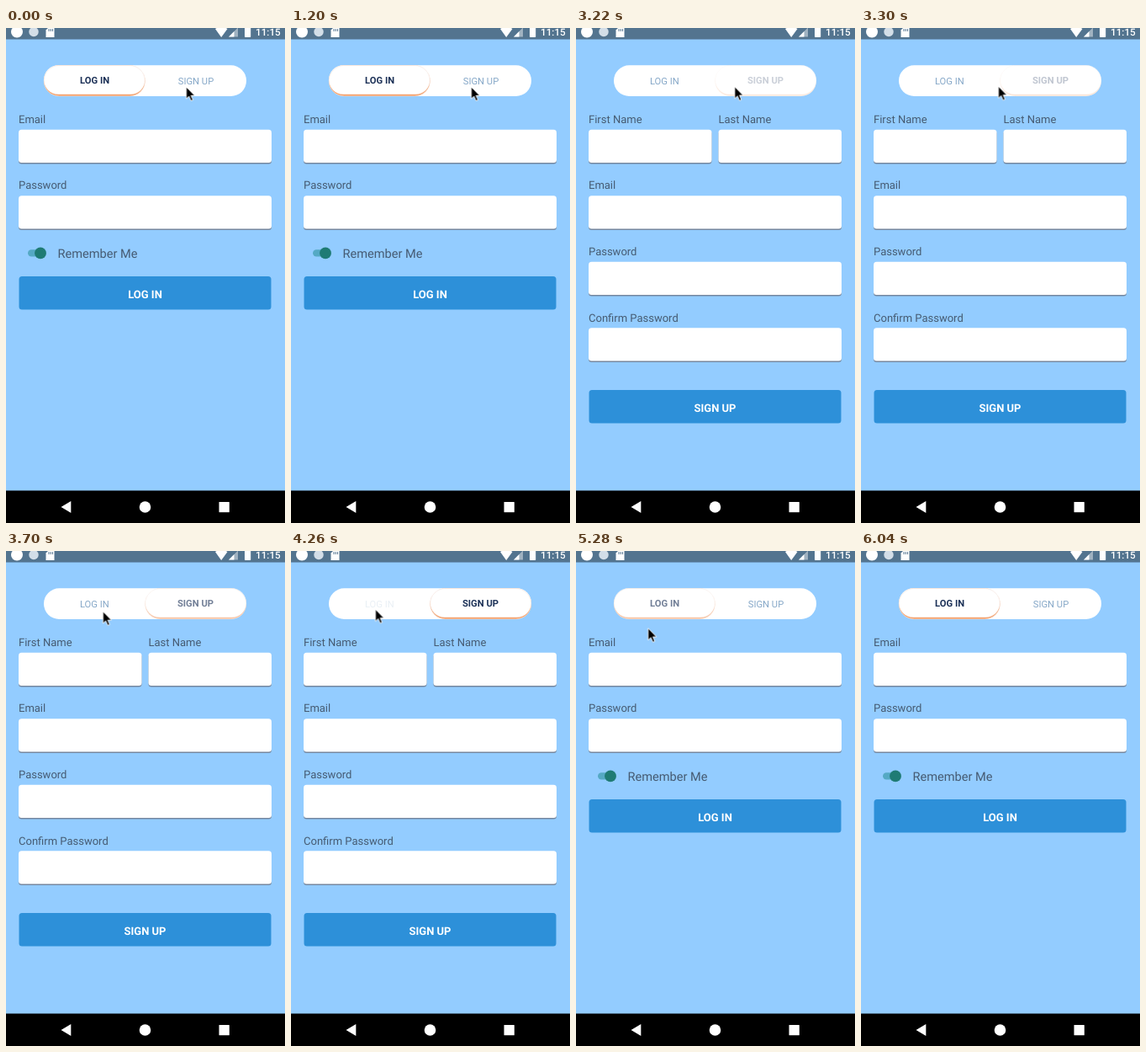
An HTML page that plays this animation: 332 px wide and 588 px high, repeating every 6.62 s.

```html
<!DOCTYPE html>
<html lang="en">
<head>
<meta charset="utf-8">
<title>Log in and sign up</title>
<style>
  html, body { margin: 0; height: 100%; overflow: hidden; background: #93ccff; }
  svg { display: block; width: 100vw; height: 100vh; }
  text { font-family: Roboto, "Noto Sans", sans-serif; text-rendering: geometricPrecision; }

  .label { font-size: 13px; fill: #465b72; }
  .remember { font-size: 14.6px; fill: #465b72; }
  .action { font-size: 13px; font-weight: 700; fill: #fff; text-anchor: middle; }
  .tab { font-size: 11.2px; fill: #86a8c8; text-anchor: middle; }
  .active { font-weight: 700; fill: #1c3157; }
  .clock { font-size: 11.7px; font-weight: 500; fill: #fff; }

  .anim { animation: 6620ms linear infinite; }
  .login-form { animation-name: login-form; animation-timing-function: step-end; }
  .signup-form { animation-name: signup-form; animation-timing-function: step-end; }
  .login-on { animation-name: login-on; animation-timing-function: step-end; }
  .login-off { animation-name: login-off; animation-timing-function: step-end; }
  .signup-on { animation-name: signup-on; animation-timing-function: step-end; }
  .signup-off { animation-name: signup-off; animation-timing-function: step-end; }
  .cursor { animation-name: cursor; }

  @keyframes login-form {
    0%, 71.299% { opacity: 1; }
    47.432% { opacity: 0; }
    100% { opacity: 1; }
  }
  @keyframes signup-form {
    0%, 71.299%, 100% { opacity: 0; }
    47.432% { opacity: 1; }
  }

  /* Tabs: dim while pressed, then recover slowly after release */
  @keyframes login-on {
    0% { opacity: 1; }
    47.432% { opacity: 0; }
    71.299% { opacity: .2; animation-timing-function: cubic-bezier(.333, .12, .667, .5); }
    84.29%, 100% { opacity: 1; }
  }
  @keyframes login-off {
    0%, 71.299%, 100% { opacity: 0; }
    47.432% { opacity: 1; }
    64.35% { opacity: .18; }
  }
  @keyframes signup-on {
    0%, 71.299%, 100% { opacity: 0; }
    47.432% { opacity: .2; animation-timing-function: cubic-bezier(.333, .12, .667, .5); }
    60.423% { opacity: 1; }
  }
  @keyframes signup-off {
    0% { opacity: 1; }
    36.556% { opacity: 1; animation-timing-function: ease-in-out; }
    38.973% { opacity: .2; }
    47.432% { opacity: 0; }
    71.299%, 100% { opacity: 1; }
  }

  @keyframes cursor {
    0%, 47.432% { transform: translate(214.5px, 70px); }
    49.849% { transform: translate(163.7px, 69.3px); animation-timing-function: ease-out; }
    55.891% { transform: translate(115.5px, 71.8px); }
    58.912%, 71.299% { transform: translate(100.5px, 69.3px); animation-timing-function: ease-in; }
    79.758% { transform: translate(86.5px, 91px); }
    81.42% { transform: translate(2px, 165px); }
    83.99%, 100% { transform: translate(-20px, 235px); }
  }
</style>
</head>
<body>
<svg viewBox="0 0 332 588" preserveAspectRatio="none">
  <defs>
    <g id="wide">
      <rect x="15" y="1" width="301" height="39.6" rx="3.5" fill="#75879f"/>
      <rect x="15" width="301" height="39.2" rx="3.5" fill="#fff"/>
    </g>
    <g id="half">
      <rect x="15" y="1" width="146.5" height="39.6" rx="3.5" fill="#75879f"/>
      <rect x="15" width="146.5" height="39.2" rx="3.5" fill="#fff"/>
    </g>
    <rect id="button" x="15.5" width="300" height="39.5" rx="3.5" fill="#2d90d9"/>
    <g id="plate">
      <rect x="45" y="44.3" width="120.5" height="36.7" rx="18.3" fill="#f4a26e"/>
      <rect x="45" y="44.3" width="120.5" height="34.4" rx="17.2" fill="#fff"/>
      <rect x="45.2" y="44.5" width="120" height="36.3" rx="18.1" fill="none" stroke="#f0dfd6" stroke-width=".5"/>
    </g>
  </defs>

  <rect width="332" height="588" fill="#93ccff"/>

  <!-- status bar -->
  <rect width="332" height="13.5" fill="#53748f"/>
  <g fill="#fff">
    <circle cx="13" cy="4.5" r="7"/>
    <circle cx="33" cy="4.5" r="5.7" fill="#d3dee8"/>
    <path d="M51 -1H57.5V11H47.5V2.5Z"/>
    <path d="M51 1V4M53.2 1V4M55.4 1V4" stroke="#53748f"/>
    <path d="M249 1Q256.200 -4 263.500 1L256.200 11Z"/>
    <path d="M265 10.500L276 -.5V10.500Z" opacity=".45"/>
    <path d="M265 10.500L271.500 4V10.500Z"/>
    <rect x="284" y="-1" width="7.200" height="12" rx=".8"/>
  </g>
  <text class="clock" x="297" y="9">11:15</text>

  <!-- tabs -->
  <rect x="45" y="44.300" width="241" height="36.700" rx="18.300" fill="#fff"/>
  <g class="anim login-on">
    <use href="#plate"/>
    <text class="tab active" x="105.600" y="66.200">LOG IN</text>
  </g>
  <text class="tab anim login-off" x="105.300" y="67.200">LOG IN</text>
  <g class="anim signup-on">
    <use href="#plate" x="120.500"/>
    <text class="tab active" x="225.500" y="66.200">SIGN UP</text>
  </g>
  <text class="tab anim signup-off" x="226" y="67.200">SIGN UP</text>

  <!-- log in -->
  <g class="anim login-form">
    <text class="label" x="15" y="112.800">Email</text>
    <use href="#wide" y="120.800"/>
    <text class="label" x="15" y="191.400">Password</text>
    <use href="#wide" y="199.300"/>
    <rect x="26" y="263.200" width="20" height="8.400" rx="4.200" fill="#55a9c4"/>
    <circle cx="41" cy="267.400" r="6.900" fill="#1f7b74"/>
    <text class="remember" x="61.500" y="272.700">Remember Me</text>
    <use href="#button" y="295"/>
    <text class="action" x="165.500" y="320.600">LOG IN</text>
  </g>

  <!-- sign up -->
  <g class="anim signup-form">
    <text class="label" x="15" y="112.800">First Name</text>
    <use href="#half" y="120.800"/>
    <text class="label" x="169.500" y="112.800">Last Name</text>
    <use href="#half" x="154.500" y="120.800"/>
    <text class="label" x="15" y="191.400">Email</text>
    <use href="#wide" y="199.300"/>
    <text class="label" x="15" y="270">Password</text>
    <use href="#wide" y="277.800"/>
    <text class="label" x="15" y="348.600">Confirm Password</text>
    <use href="#wide" y="356.300"/>
    <use href="#button" y="430"/>
    <text class="action" x="165.500" y="455.600">SIGN UP</text>
  </g>

  <!-- navigation bar -->
  <rect y="549.500" width="332" height="38.500"/>
  <g fill="#fff">
    <path d="M65.500 569L77.300 562V576Z"/>
    <circle cx="165.500" cy="569" r="6.800"/>
    <rect x="253.500" y="563" width="12.300" height="12.300" rx=".6"/>
  </g>

  <path class="anim cursor" d="M0 0V14.200L3.300 11.200 5.700 16.500 8 15.500 5.700 10.300H10Z" stroke="#fff" stroke-width=".9"/>
</svg>
</body>
</html>
```
